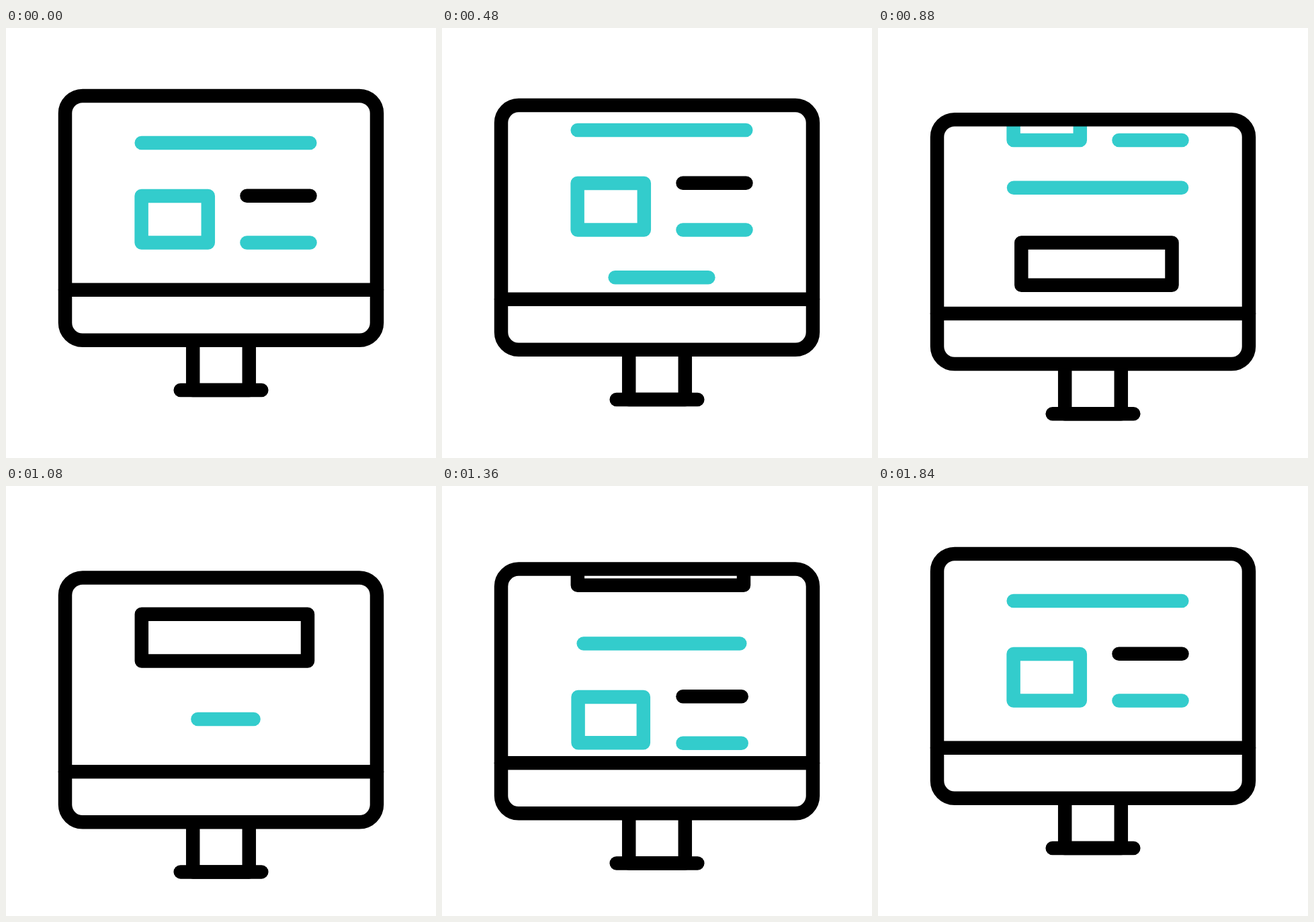
Animation of 640x640 px, one loop 1880 ms. Source, as an HTML page with a canvas:

```html
<!DOCTYPE html>
<html lang="en">
<head>
<meta charset="utf-8">
<title>Scrolling page on a monitor</title>
<style>
  html, body { margin: 0; width: 100%; height: 100%; overflow: hidden; background: #fff; }
  canvas { display: block; }
</style>
</head>
<body>
<canvas id="stage" width="640" height="640"></canvas>
<script>
const ctx = document.getElementById('stage').getContext('2d');
const LOOP = 1880, STEP = 40, PAGE = 454;
const BLACK = '#000', CYAN = '#33cccc';

// Easing curve through (0,0), (x1,0), (x2,1), (1,1)
function bezier(x1, x2) {
  return p => {
    if (p <= 0) return 0;
    if (p >= 1) return 1;
    let lo = 0, hi = 1;
    for (let i = 0; i < 30; i++) {
      const u = (lo + hi) / 2, v = 1 - u;
      if (3 * x1 * v * v * u + 3 * x2 * v * u * u + u * u * u < p) lo = u; else hi = u;
    }
    return lo * lo * (3 - 2 * lo);
  };
}

const easeScroll = bezier(0.62, 0.38);
const easeDown = bezier(0.62, 0.38);
const easeUp = bezier(0.61, 0.31);
const easeGrow = bezier(0.48, 0.45);
const tween = (ease, t, from, to) => ease((t - from) / (to - from));

function line(color, x1, x2, y) {
  ctx.strokeStyle = color;
  ctx.beginPath();
  ctx.moveTo(x1, y);
  ctx.lineTo(x2 + 0.01, y);
  ctx.stroke();
}

// Box and bar are given by their centre, so they can grow from it
function box(color, cx, cy, halfW, halfH, scale) {
  const w = halfW * scale, h = halfH * scale;
  ctx.strokeStyle = color;
  ctx.strokeRect(cx - w, cy - h, 2 * w, 2 * h);
}

function bar(y, scale) {
  line(CYAN, 327 - 125.3 * scale, 327 + 125.3 * scale, y);
}

function header(y, barScale, boxScale, lineScale) {
  const end = 358.5 + 94 * lineScale;
  bar(y + 171, barScale);
  box(CYAN, 251.2, y + 284.7, 49.6, 34.8, boxScale);
  line(BLACK, 358.5, end, y + 249.8);
  line(CYAN, 358.5, end, y + 319.4);
}

function page(t) {
  const scroll = PAGE * tween(easeScroll, t, 40, 1840);
  const grow = (from, to) => tween(easeGrow, t, from, to);
  const late = grow(793, 1528);
  ctx.save();
  ctx.beginPath();
  ctx.rect(88, 101, 464, 288.7);
  ctx.clip();
  ctx.translate(0, -scroll);
  header(0, 1, 1, 1);
  bar(390.2, grow(40, 920));
  box(BLACK, 325.4, 503.6, 123.6, 34.8, grow(300, 1080));
  header(PAGE, late, grow(718, 1453), late);
  ctx.restore();
}

function monitor() {
  ctx.strokeStyle = BLACK;
  ctx.beginPath();
  ctx.roundRect(88, 101, 464, 363.8, 26);
  ctx.rect(278.2, 464.8, 83.6, 74.1);
  ctx.stroke();
  line(BLACK, 88, 552, 389.7);
  line(BLACK, 259.7, 380.3, 538.9);
}

function draw() {
  const t = Math.floor(performance.now() % LOOP / STEP) * STEP;
  const drop = 35.8 * (tween(easeDown, t, 40, 1000) - tween(easeUp, t, 1000, 1850));
  ctx.clearRect(0, 0, 640, 640);
  ctx.save();
  ctx.translate(0, drop);
  ctx.lineWidth = 20.5;
  ctx.lineCap = ctx.lineJoin = 'round';
  page(t);
  monitor();
  ctx.restore();
  requestAnimationFrame(draw);
}
draw();
</script>
</body>
</html>
```
